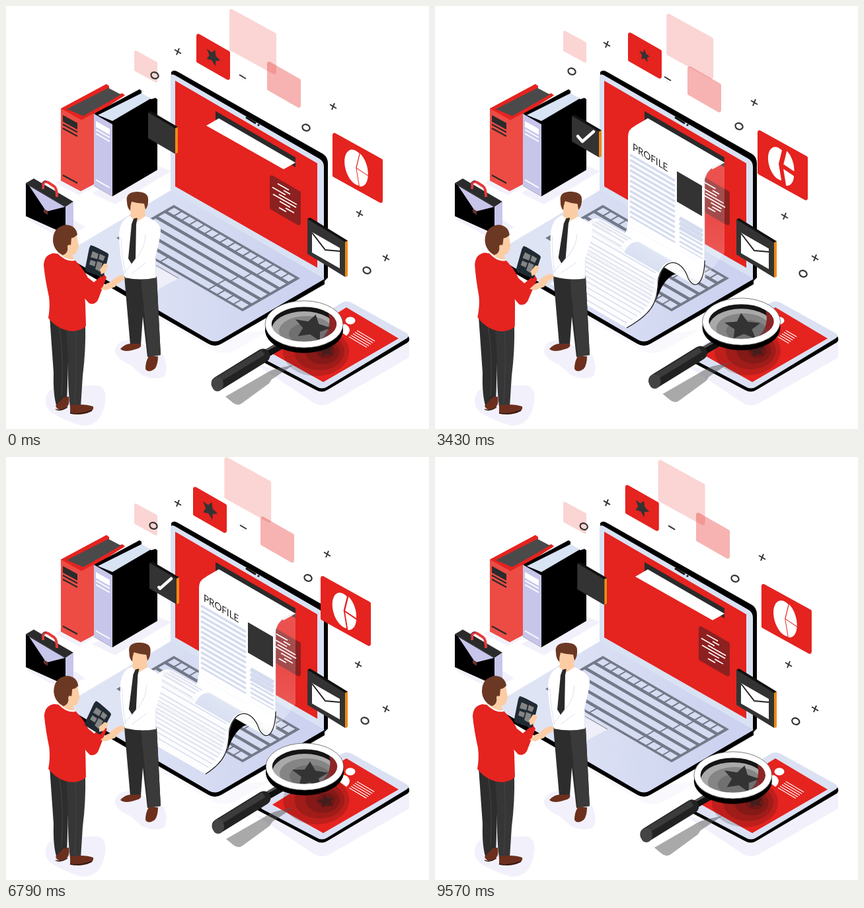
Animation of 640x640 px, one loop 9.64 s. Source, as an HTML page with a canvas:

```html
<!DOCTYPE html>
<html lang="en">
<head>
<meta charset="utf-8">
<title>Profile review</title>
<style>
html,body{margin:0;width:100%;height:100%;overflow:hidden;background:#fff}
canvas{display:block;width:100vmin;height:100vmin}
</style>
</head>
<body>
<canvas id="stage"></canvas>
<script>
const canvas = document.getElementById('stage');
const ctx = canvas.getContext('2d');
const ratio = window.devicePixelRatio || 1;
canvas.width = canvas.height = 640 * ratio;

const LOOP = 9640, BEATS = [0, 2290, 3430, 5430, 6790, 8070];
const RED = '#e5231f', INK = '#333', PALE = '#d9e2f3', LILAC = '#c7c6ea', SKIN = '#fccda4',
  GROUND = '#f2f1fb', HAIR = '#6b3823', SHOE = '#6d2f1d', ORANGE = '#ef8a17';
let now = 0;

// Periodic monotone cubic through the given values.
function curve(values, times = BEATS) {
  const n = values.length;
  const value = j => values[(j + n) % n];
  const time = j => times[(j + n) % n] + LOOP * Math.floor(j / n);
  const slope = j => (value(j + 1) - value(j)) / (time(j + 1) - time(j));
  const tangent = j => {
    const a = slope(j - 1), b = slope(j);
    return a * b <= 0 ? 0 : 2 * a * b / (a + b);
  };
  let i = -1;
  while (i < n - 1 && times[i + 1] <= now) i++;
  const span = time(i + 1) - time(i), p = (now - time(i)) / span, q = 1 - p;
  return value(i) * q * q * (1 + 2 * p) + value(i + 1) * p * p * (3 - 2 * p)
    + span * p * q * (tangent(i) * q - tangent(i + 1) * p);
}

const fill = (d, color) => { ctx.fillStyle = color; ctx.fill(new Path2D(d)); };
function line(d, color, width, cap = 'butt') {
  ctx.strokeStyle = color;
  ctx.lineWidth = width;
  ctx.lineCap = cap;
  ctx.lineJoin = cap === 'round' ? 'round' : 'miter';
  ctx.stroke(new Path2D(d));
}
function at(x, y, draw, angle = 0) {
  ctx.save();
  ctx.translate(x, y);
  ctx.rotate(angle);
  draw();
  ctx.restore();
}
const pivot = (x, y, angle, draw) => at(x, y, () => { ctx.translate(-x, -y); draw(); }, angle);
function oval(x, y, rx, ry, color, width) {
  ctx.beginPath();
  ctx.ellipse(x, y, rx, ry, 0, 0, 7);
  if (width) { ctx.strokeStyle = color; ctx.lineWidth = width; ctx.stroke(); }
  else { ctx.fillStyle = color; ctx.fill(); }
}
function gradient(x1, y1, x2, y2, ...colors) {
  const g = ctx.createLinearGradient(x1, y1, x2, y2);
  colors.forEach((c, i) => g.addColorStop(i / (colors.length - 1), c));
  return g;
}
function panel(x, y, w, drop, h, color, r = 3) {
  ctx.beginPath();
  ctx.moveTo(x, y + h / 2);
  ctx.arcTo(x, y, x + w, y + drop, r);
  ctx.arcTo(x + w, y + drop, x + w, y + drop + h, r);
  ctx.arcTo(x + w, y + drop + h, x, y + h, r);
  ctx.arcTo(x, y + h, x, y, r);
  ctx.closePath();
  ctx.fillStyle = color;
  ctx.fill();
}
function star(r, color, angle) {
  ctx.rotate(angle);
  ctx.beginPath();
  for (let i = 0; i < 10; i++) {
    const a = i * Math.PI / 5 - Math.PI / 2, d = i % 2 ? r * .48 : r;
    ctx.lineTo(d * Math.cos(a), d * Math.sin(a));
  }
  ctx.fillStyle = color;
  ctx.fill();
}

function shadows() {
  fill('M130 283L165 300L250 250L220 238ZM75 268L110 286L140 270L100 250ZM30 322L85 352L120 335L90 315Z', GROUND);
  fill('M190 450L308 518Q330 532 352 518L400 490L320 500Z', '#f8f8fd');
  fill('M375 540L465 600Q478 608 492 600L610 532V505L478 575Z', GROUND);
  fill('M60 600Q58 578 85 575L140 574Q155 580 149 605Q142 636 115 635Q84 626 68 614Q61 608 60 600Z', GROUND);
  fill('M165 520Q170 503 195 506L238 528Q246 545 240 560Q225 568 205 558L188 543Q164 533 165 520Z', GROUND);
}

function books() {
  fill('M83 155L152 118L156 121V126L170 134L176 132L180 135L134 165V269L113 280L83 264Z', RED);
  fill('M83 155L113 172L134 162V269L113 280L83 264Z', '#ed4c45');
  fill('M92 156L155 124L174 134L118 167Z', '#4a4a4a');
  line('M113 171L177 135', RED, 4);
  fill('M86 165L108 177V187L86 175Z', '#2b2b2b');
  line('M86 179L108 191M86 185L108 197M86 256L108 268', '#2b2b2b', 2.4);
  fill('M133 163L202 126L205 128V133L220 141L226 139L229 141V248L161 288L133 272Z', '#000');
  fill('M139 165L205 132L219 140L161 174Z', '#d8e3f3');
  fill('M133 163L161 179V288L133 272Z', LILAC);
  fill('M136 174L157 186V195L136 183Z', '#fff');
  line('M136 187L157 199M136 193L157 205M136 263L157 275', '#fff', 2);
}

function briefcase() {
  fill('M30 268L42 261L102 296L90 304Z', '#2b2b2b');
  fill('M30 268L90 304V345L30 318Z', '#000');
  fill('M90 304L102 296V338L90 345Z', LILAC);
  fill('M35 272L89 304L61 311Z', LILAC);
  fill('M57 307L63 310V316L57 312Z', '#66332d');
  line('M56 277V270Q57 264 64 267L73 273Q77 276 77 289', '#e33b3b', 4);
  line('M54 276V269Q56 264 61 265', '#26304d', 1);
}

function laptop() {
  fill('M250 100Q253 96 259 99L480 224Q487 229 487 238V411L482 416L249 280Z', '#000');
  fill('M249 107Q250 101 256 105L474 231Q481 235 481 243V413L249 280Z', PALE);
  fill('M256 113L471 238V396L256 273Z', RED);
  line('M364 169L377 177', '#111', 3, 'round');
  oval(382, 180, 1.6, 1.6, '#111');
  fill('M249 284L482 414V421L326 511Q316 517 306 511L101 393Q93 388 97 380Z', '#000');
  fill('M249 279L482 413L325 505Q316 510 307 505L103 386Q94 380 103 366Z',
    gradient(170, 400, 440, 390, '#dfe4f5', '#ccd2ef'));
  ctx.save();
  ctx.transform(1.91, 1.11, -.87, .5, 254, 301);
  ctx.fillStyle = '#737988';
  ctx.fillRect(0, 0, 100, 100);
  ctx.fillStyle = '#d6dcf2';
  for (let i = 0; i < 16; i++) ctx.fillRect(2 + i * 6.05, 4, 5, 11);
  for (let row = 1; row < 5; row++) {
    const split = 84 - row * 3;
    ctx.fillRect(2, 4 + row * 16.2, split - 3, 11);
    ctx.fillRect(split, 4 + row * 16.2, 98 - split, 11);
  }
  [[2, 7], [10, 6], [17, 6], [24, 9], [34, 37], [72, 6], [79, 6], [86, 5], [92, 6]]
    .forEach(([x, w]) => ctx.fillRect(x, 85, w, 11));
  ctx.restore();
  fill('M210 386L261 412L222 433L180 408Z', '#efeff9');
  line('M225 391L261 412', '#666', .8);
  fill('M317 159L438 229V244L317 173Z', '#2b2b2b');
}

function noteCard() {
  panel(399, 254, 47, 27, 53, '#8d2020');
  const sway = curve([0, 4, 5, -2, 3, -2]);
  [[12, 17], [21, 10], [4, 20], [14, 27], [5, 35], [15, 16], [24, 13], [14, 11]].forEach(([x, w], i) => {
    const start = 399 + x + sway * (i % 3 - 1) * .7, y = 262 + i * 5 + (start - 399) * .57;
    line(`M${start} ${y}l${w} ${w * .57}`, '#fff', 1.7);
  });
}

const CURL = [[[408, 385], [408, 415], [395, 434], [383, 412]],
  [[383, 412], [374, 383], [348, 378], [338, 412]], [[338, 412], [336, 445], [334, 462], [290, 487]]];
const EDGE = [-116, -67];
function curl(u, across = 0) {
  const k = Math.min(2, Math.floor(u)), p = u - k, q = 1 - p;
  const w = [q * q * q, 3 * q * q * p, 3 * q * p * p, p * p * p];
  return [0, 1].map(i => w.reduce((sum, f, j) => sum + f * CURL[k][j][i], across * EDGE[i]));
}
function band(u1, u2, a1, a2, color) {
  fill('M' + [curl(u1, a1), curl(u2, a1), curl(u2, a2), curl(u1, a2)].join('L') + 'Z', color);
}

function paper() {
  const out = curve([0, 0, 1, 1.84, 2, 2, 1.967, 1, 0], [0, 250, 1200, 2290, 3100, 6450, 6790, 8070, 9200]);
  fill('M322 170L303 181L420 247L438 237Z', '#fff');
  if (out <= 0) return;
  const low = 190 + 156 * Math.min(1, out);
  ctx.save();
  ctx.clip(new Path2D(`M280 140H450V${low + 92}L280 ${low - 7}Z`));
  fill('M408 262Q413 242 438 237V374L408 412Z', gradient(0, 240, 0, 412, '#ffffff38', '#ffffff30', '#ffffff48'));
  fill('M292 345V198Q292 187 300 183L322 170L438 237Q413 242 408 262V413Z', '#fff');
  line('M438 237Q413 242 408 262V412', '#c9cde0', .6);
  ctx.save();
  ctx.transform(.87, .54, 0, 1, 299, 218);
  ctx.font = '400 15.5px Lato, sans-serif';
  ctx.fillStyle = '#222';
  ctx.fillText('PROFILE', 0, 0);
  ctx.restore();
  for (let i = 0; i < 15; i++) {
    const y = 225 + i * 7.8, w = i === 13 ? 43 : 68;
    line(`M295 ${y}l${w} ${w * .58}`, '#d5dcef', 3.6);
    if (i < 8) line(`M370 ${321 + i * 7}l35 20`, '#d5dcef', i < 3 ? 6 : 3);
  }
  fill('M366 250L404 272V318L366 296Z', INK);
  ctx.restore();
  if (out <= 1) return;

  const end = 3 * (out - 1);
  if (end > 1.7) fill('M380 405C372 385 348 380 339 412L335 445Q344 416 360 407Q374 402 383 415Z', '#000');
  const step = .04, rim = [];
  for (let u = 0; u < end; u += step) {
    const next = Math.min(end, u + step);
    band(u, next, 0, 1, '#fff');
    if (u > 1.42 && u < 1.92) band(u, next, .02, .47, '#d9e0f2');
    rim.push(curl(u));
  }
  rim.push(curl(end));
  for (let u = 1.55; u < end - .03; u += u < 2 ? .1 : .075)
    line('M' + curl(u, .95) + 'L' + curl(u, u < 1.95 ? .53 : .05), '#e0e3f1', 2.2);
  line('M' + rim.join('L'), '#111', 1.2);
}

function floatingPanels() {
  panel(194, curve([66, 38, 36, 52, 69, 72]), 35, 19, 32, '#e5231f30', 2);
  const drift = curve([.38, 1, 1, .29, 0, 0], [0, 2070, 3050, 5430, 7070, 8050]);
  panel(330 + drift * 21, -2 + drift * 12, 71, 39, 64, '#e5231f30');
  panel(curve([395, 388, 382, 380, 385, 393]), curve([82, 86, 89, 91, 88, 83]), 51, 29, 45, '#e5231f58');

  at(curve([288, 293, 292, 285, 283, 284]), curve([40, 37, 38, 42, 43, 43]), () => {
    panel(0, 0, 51, 29, 45, RED);
    ctx.transform(.87, .45, 0, 1, 25, 37);
    star(curve([13, 9.5, 9.5, 12, 14, 14]), INK, curve([.3, 0, 0, .12, .28, .3]));
  });

  at(curve([494, 495, 488, 476, 476, 482.5]), curve([190, 191, 186, 178, 178, 182]), () => {
    panel(0, 0, 76, 42, 68, RED);
    ctx.transform(.67, .36, 0, 1, 36, 55);
    const spread = curve([1, 4, 6, 4, 2, 1]);
    [[75, 288], [288, 365], [5, 75]].forEach(([from, to]) => {
      const a = from * Math.PI / 180, b = to * Math.PI / 180, mid = (a + b) / 2;
      ctx.beginPath();
      ctx.moveTo(spread * Math.cos(mid), spread * Math.sin(mid));
      ctx.arc(spread * Math.cos(mid), spread * Math.sin(mid), 26 - spread / 3, a, b);
      ctx.fillStyle = '#fff';
      ctx.fill();
    });
  });
}

function tile(w, drop, h) {
  fill(`M0 0L4 -2L${w + 4} ${drop - 2}V${drop + h - 2}L${w} ${drop + h}Z`, '#111');
  fill(`M${w} ${drop}l4 -2v${h}l-4 2Z`, ORANGE);
  panel(0, 0, w, drop, h, INK, 1);
}

function darkTiles() {
  at(curve([215, 207, 207, 211, 217, 218]), curve([161, 166, 166, 163, 160, 160]), () => {
    tile(41, 24, 39);
    const from = curve([0, 0, 0, 0, 8, 40], [0, 600, 5400, 6100, 6790, 7700]);
    const to = curve([0, 0, 40, 40, 40, 0], [0, 600, 1700, 6100, 8100, 8110]);
    if (to - from > .5) {
      ctx.setLineDash([to - from, 80]);
      ctx.lineDashOffset = -from;
      line('M9 31L16 39L33 24', '#fff', 4.5, 'round');
      ctx.setLineDash([]);
    }
  });
  at(456, 322 + curve([0, 0, -11, 1, 0, 0], [0, 1300, 2290, 3300, 5430, 8070]), () => {
    tile(57, 35, 53);
    fill('M7 20L49 44V75L7 51Z', '#fff');
    line('M7 21L27 47L49 49', '#222', 2);
  });
}

function marks() {
  const ring = (xs, ys) => at(curve(xs), curve(ys), () => oval(0, 0, 5.8, 4.7, INK, 2.2), .45);
  ring([225, 210, 207, 214, 223, 228], [105, 100, 99, 101, 104, 107]);
  ring([454, 458, 460, 460, 457, 455], [184, 183, 182, 182, 183, 184]);
  ring([546, 556, 557, 549, 543, 541], [400, 404, 405, 401, 399, 398]);
  const cross = (x, y) => at(x, y, () => line('M-5 -3L5 3M2 -5L-2 5', INK, 2));
  cross(260, curve([69, 59, 58, 64, 70, 72]));
  cross(curve([495, 488, 483, 481, 486, 492]), curve([152, 148, 146, 145, 147, 150]));
  cross(curve([535, 531, 529, 531, 533, 535]), curve([314, 317, 318, 316, 314, 314]));
  cross(575, 381);
  at(curve([358, 352, 352, 356, 359, 360]), curve([107, 110, 110, 108, 106, 106]), () => {
    line('M0 -5L-1 6', '#3333', .8);
    line('M-5 -3L5 3', INK, 2);
  });
}

function tablet() {
  fill('M385 531L515 452L609 500Q612 505 608 509L486 581Q478 586 469 581L380 534Z', '#000');
  fill('M508 449Q515 445 523 449L606 495Q612 499 606 503L486 576Q478 581 470 576L388 533Q382 528 388 524Z', '#dbe1f3');
  fill('M515 456L594 503L480 569L403 526Z', RED);
  oval(521, 476, 7.5, 5.8, '#fff');
  fill('M500 488Q511 476 518 485Q523 492 515 499Z', '#fff');
  const size = curve([1, .65, .6, .75, .97, 1]);
  for (let i = 0; i < 5; i++) line(`M${531 - i * 3} ${491 + i * 2.4}l${27 * size} ${16 * size}`, '#fff', 1.2);
}

function magnifier() {
  const times = [0, 1000, 2290, 3430, 4070, 5430, 6790, 8070, 9000];
  const dx = curve([0, 4, 9.5, 12.5, 11.5, 7, 1, -2, -1.5], times);
  const dy = curve([0, 1, -1, -4, -6, -10, -13, -7.5, -2], times);
  ctx.save();
  ctx.clip(new Path2D('M515 447L610 500L478 580L384 528Z'));
  [50, 38, 26, 14].forEach(r => oval(482 - (50 - r) * -.05 - (r - 14) * .36 + dx * .3, 523 + dy * .3, r, r * .74, '#1010102d'));
  at(484 + dx * .2, 521, () => { ctx.scale(1.1, .85); star(13, '#2228', -.2); });
  ctx.restore();

  ctx.save();
  ctx.translate(dx, dy);
  fill('M332 591L391 557Q402 550 412 548L435 543L402 565L398 571L357 601Q350 606 343 600Z', '#55555580');
  line('M390 528L418 512', '#111', 12);
  line('M388 524L414 510', '#555', 3);
  line('M321 571L389 529', '#222', 21, 'round');
  line('M320 566L389 524', '#3b3b3b', 9);
  oval(320, 572, 9, 11, '#444');
  ctx.beginPath();
  ctx.ellipse(451, 490, 59, 35, 0, 0, 7);
  ctx.ellipse(451, 483, 49, 28, 0, 0, 7);
  ctx.fillStyle = '#000';
  ctx.fill('evenodd');
  ctx.save();
  ctx.beginPath();
  ctx.ellipse(451, 481, 49.5, 28.5, 0, 0, 7);
  ctx.clip();
  oval(451, 481, 52, 31, '#151515');
  oval(451, 490, 49, 28, '#a9a9a9');
  oval(454, 492, 41, 23, '#858585');
  fill('M488 465Q512 480 496 502Q486 510 474 507Q494 490 488 465Z', '#8e2425');
  oval(459, 496, 31, 17, '#55555570');
  at(curve([463, 467, 466, 465, 460, 457]) - dx, curve([487, 487, 486, 482, 482, 485]) - dy, () => {
    ctx.transform(1.15, .1, 0, .85, 0, 0);
    star(25, INK, curve([.2, -.1, -.1, -.1, 0, .1]));
  });
  ctx.restore();
  oval(451, 481.5, 54, 31, '#fff', 9.5);
  oval(451, 481.5, 59, 35.5, '#222', .6);
  ctx.restore();
}

function clerk() {
  fill('M179 409H228L231 470L234 528L214 531L207 470L204 513L188 513Z', '#2d2d2d');
  fill('M204 411H228L234 528L216 531Z', '#3a3a3a');
  fill('M173 519Q180 511 188 511H204Q206 517 197 519Q180 525 173 519Z', SHOE);
  fill('M211 549Q211 538 216 530H230Q230 543 225 549Q215 556 211 549Z', SHOE);
  pivot(205, 410, curve([0, .043, .06, .06, .03, .005]), () => {
    fill('M187 318Q173 323 171 345Q171 375 180 411Q204 416 227 411L226 380Q234 350 234 338Q232 326 211 318Z', '#fff');
    line('M226 380L227 410M174 350Q175 380 181 405M211 345Q211 365 197 382L176 407M190 405L212 388', '#dfe2f2', 1);
    fill('M190 306H209L211 318L197 327L188 318Z', SKIN);
    fill('M193 322L199 320L197 330L196 382L190 390L185 382L190 330Z', '#292929');
    fill('M188 294H211V308Q208 321 199 321Q187 319 188 304Z', SKIN);
    fill('M183 296Q180 282 198 281Q214 281 215 291Q216 302 211 308L209 299Q200 299 190 296Q188 302 188 310Q183 305 183 296Z', HAIR);
    fill('M177 407Q166 408 158 418Q161 424 172 418L180 413Z', SKIN);
  });
}

function manager() {
  fill('M66 470L94 480V540L92 602L77 607Q71 590 72 555Z', '#2d2d2d');
  fill('M91 485L120 482Q121 520 116 560L113 607H97Q93 575 94 535Z', '#363636');
  line('M80 480Q88 530 84 590M105 490Q108 540 104 600', '#444', 1);
  fill('M75 605Q80 600 87 592L95 591Q97 602 92 607Q80 616 75 605Z', SHOE);
  fill('M97 604L112 603Q124 603 132 606Q134 612 123 616Q108 620 97 616Z', SHOE);
  line('M75 610Q82 614 93 607M97 616Q112 619 130 612', '#2a1610', 1.4);
  pivot(95, 480, curve([0, .033, .036, .028, .01, -.004]), () => {
    fill('M80 370H98L104 386L92 390L76 378Z', SKIN);
    fill('M72 374Q58 376 57 392Q59 413 65 440Q67 455 64 472Q80 492 103 492Q116 490 121 484L120 450L117 412Q113 393 104 384Q93 388 79 375Z', RED);
    fill('M103 384Q116 395 124 411L133 418L148 405L152 411L139 445Q134 453 126 450L117 440L105 405Z', RED);
    line('M79 374Q92 387 104 384', '#fff', 2);
    fill('M94 349L107 347L110 362Q109 376 99 377L84 376Z', SKIN);
    fill('M71 355Q71 334 91 331Q106 332 108 346Q103 351 99 351L98 362Q95 360 93 363Q95 374 86 377Q72 370 71 355Z', HAIR);
  });
  fill('M143 428L152 420L160 417Q169 414 171 417L165 425L151 430Z', SKIN);
  at(curve([138, 140, 142, 141, 140, 139]), curve([386, 387, 388, 395, 395, 392]), () => {
    fill('M-10 -24Q-8 -25 14 -13Q18 -11 17 -8L10 21Q9 25 5 23L-16 16Q-19 14 -18 10L-12 -20Z', '#202a33');
    fill('M-7 -15L2 -11L0 -3L-10 -6ZM4 -11L12 -7L9 0L2 -3ZM-10 -2L-2 1L-4 8L-12 5ZM0 0L8 3L4 16L-3 12Z', '#858585');
    fill('M10 4Q17 3 16 8L12 17L6 20L4 13Z', SKIN);
  }, curve([0, .04, .08, .24, .24, .14]));
}

function render() {
  ctx.setTransform(ratio, 0, 0, ratio, 0, 0);
  ctx.fillStyle = '#fff';
  ctx.fillRect(0, 0, 640, 640);
  [shadows, books, briefcase, laptop, noteCard, paper, floatingPanels, darkTiles, marks,
    tablet, magnifier, clerk, manager].forEach(draw => draw());
}

function tick() {
  now = performance.now() % LOOP;
  render();
  requestAnimationFrame(tick);
}
tick();
</script>
</body>
</html>
```
